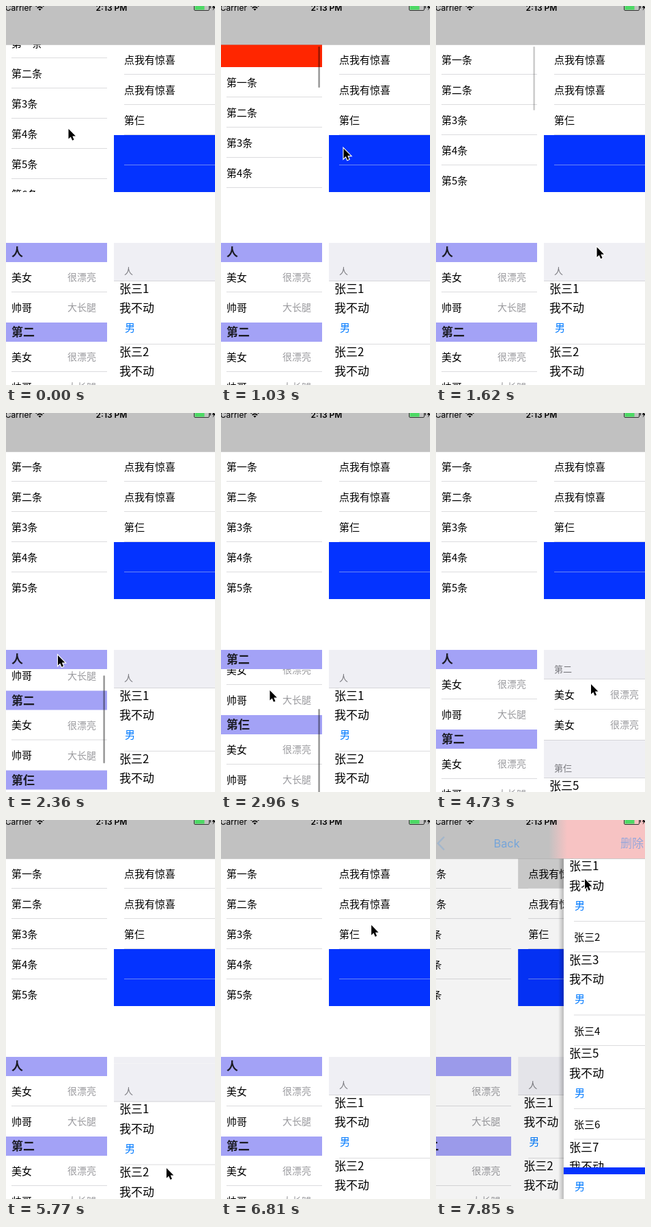
Write an HTML page that moves like this. It is 306 px wide and 552 px high and loops after 8 s.

```html
<!DOCTYPE html>
<html lang="zh">
<head>
<meta charset="utf-8">
<title>Nested lists</title>
<style>
  html, body { margin: 0; width: 100%; height: 100%; overflow: hidden; background: #fff; }
  svg { display: block; }
  text { font-family: "Noto Sans CJK SC", "Noto Sans CJK", sans-serif; }
  .ui { font-family: Inter, Roboto, sans-serif; }
</style>
</head>
<body>
<svg id="stage" width="306" height="552" viewBox="0 0 306 552"></svg>
<script>
const LOOP = 8000, BEATS = 54;
const BLUE = '#0433ff', TINT = '#007aff', LINE = '#dcdcde', GROUP = '#efeff4', EDGE = '#d6d6da';

const rect = (x, y, w, h, fill, extra = '') =>
  `<rect x="${x}" y="${y}" width="${w}" height="${h}" fill="${fill}" ${extra}/>`;
// y is the vertical middle of the glyphs
const label = (s, x, y, size = 15, fill = '#000', extra = '') =>
  `<text x="${x}" y="${y + size * .38}" font-size="${size}" fill="${fill}" ${extra}>${s}</text>`;
const rule = (x, y, w, fill = LINE) => rect(x, y - 1, w, 1, fill);
const frame = (x, y, w, h, body) =>
  `<svg x="${x}" y="${y}" width="${w}" height="${h}" viewBox="${x} ${y} ${w} ${h}">${body}</svg>`;
const group = (id, body) => `<g id="${id}">${body}</g>`;
const bar = (id, y, h) => rect(142.3, y, 2.6, h, '#000', `id="${id}" rx="1.3"`);

const person = (i, x, y) =>
  label('张三' + i, x + 8, y + 10.3, 17) + label('我不动', x + 8, y + 39, 17) +
  label('男', x + 16, y + 67.5, 15, TINT);
const detailRow = (name, note, x, y) =>
  label(name, x, y + 22) + label(note, x + 124, y + 22, 14, '#9a9a9e', 'text-anchor="end"');

function plainList() {
  let s = rect(-7, -144, 155, 200, '#ff2600');
  for (let i = 0; i < 11; i++) {
    const y = 56 + 44 * i;
    s += label(`第${['一', '二'][i] || i + 1}条`, 8, y + 22) + rule(8, y + 44, 140);
  }
  return frame(-7, 56, 155, 215, group('plain', s) + bar('plainBar', 59, 93));
}

function surpriseList() {
  let s = rect(158, 56, 155, 44, '#d2d2d2', 'id="pressed"');
  ['点我有惊喜', '点我有惊喜', '第仨'].forEach((t, i) => {
    s += label(t, 173, 78 + 44 * i) + rule(173, 100 + 44 * i, 140);
  });
  return s + rect(158, 188, 155, 83, BLUE) + rule(173, 232, 140, '#6c84f4');
}

const heads = ['人', '第二', '第仨'];
function stickyList() {
  let rows = '', tops = '';
  heads.forEach((t, i) => {
    const y = 373 + 116 * i;
    rows += detailRow('美女', '很漂亮', 8, y) + rule(8, y + 44, 140) +
      detailRow('帅哥', '大长腿', 8, y + 44);
    tops += group('head' + i, rect(-7, 0, 155, 28, '#a3a2f6') +
      label(t, 8, 14, 17, '#1c1c24', 'font-weight="600"'));
  });
  return frame(-7, 345, 155, 211, group('sticky', rows) + tops + bar('stickyBar', 348, 128));
}

function groupedList() {
  let y = 345, s = rect(158, 245, 155, 100, GROUP);
  heads.forEach((t, i) => {
    s += rect(158, y, 155, 56, GROUP) + (i ? rule(158, y + 1, 155, EDGE) : '') +
      label(t, 173, y + 41, 13, '#77777c') + rule(158, y + 56, 155, EDGE);
    y += 56;
    for (let k = 0; k < 2; k++) {
      s += i === 1 ? detailRow('美女', '很漂亮', 173, y) : person(2 * i + k + 1, 158, y);
      y += i === 1 ? 44 : 92;
      if (!k) s += rule(173, y, 140);
    }
  });
  return frame(158, 345, 155, 211, group('grouped', s));
}

function nextPage() {
  let y = 56, s = rect(-8, 56, 8, 496, 'url(#shade)') + rect(0, 56, 320, 496, '#fff');
  for (let i = 1; i < 8; i++) {
    s += i % 2 ? person(i, 0, y + .5) : label('张三' + i, 15, y + 22.5);
    y += i % 2 ? 92 : 44.5;
    s += rule(15, y, 305);
  }
  return s + rect(0, 506, 320, 10, BLUE) + rect(-22, 0, 342, 56, 'url(#glow)');
}

const statusBar = () =>
  label('Carrier', 38, 2.7, 12, '#000', 'class="ui" text-anchor="end"') +
  `<path d="M43.6 .6Q49.5-4.6 55.4.6M45.8 3Q49.5-.2 53.2 3" fill="none" stroke="#000" stroke-width="1.7"/>
  <path d="M47.4 4.6Q49.5 2.8 51.6 4.6L49.5 6.8Z"/>` +
  label('2:13 PM', 154.5, 2.7, 12, '#000', 'class="ui" font-weight="600" text-anchor="middle"') +
  rect(275.5, -3.5, 22, 10, 'none', 'rx="1.5" stroke="#333"') +
  rect(276.5, -2.5, 14, 8, '#4cd964') + rect(298.5, 0, 1.5, 3.5, '#333') +
  '<path d="M306-4L301.8 2.4H304.2L302.6 6.8L307 1H304.6Z"/>';

const navText = () =>
  `<path d="M12 24.5L2.8 34L12 43.5" fill="none" stroke="${TINT}" stroke-width="2.5" opacity=".4"/>` +
  label('Back', 0, 34, 16.3, TINT, 'id="back" class="ui" text-anchor="middle"') +
  label('删除', 287, 34, 17, TINT, 'text-anchor="middle"');

const stage = document.getElementById('stage');
stage.innerHTML = `<defs>
  <linearGradient id="shade"><stop stop-opacity="0"/><stop offset="1" stop-opacity=".24"/></linearGradient>
  <linearGradient id="glow"><stop stop-color="#f7c3c3" stop-opacity="0"/>
    <stop offset=".08" stop-color="#f7c3c3"/></linearGradient></defs>` +
  rect(0, 0, 306, 552, '#fff') +
  group('home', plainList() + surpriseList() + stickyList() + groupedList()) +
  rect(0, 56, 306, 496, '#000', 'id="dim"') +
  rect(0, 0, 306, 56, '#c1c1c1') +
  group('next', nextPage()) +
  rect(0, 56, 306, .6, '#aaa') +
  group('navText', navText()) +
  statusBar() +
  `<path id="cursor" d="M0 0V14.6L3.3 11.5L5.6 16.8L8 15.7L5.8 10.6H10.4Z"
    stroke="#fff" stroke-width="2.2" paint-order="stroke"/>`;

const el = {};
stage.querySelectorAll('[id]').forEach(e => el[e.id] = e);

// Stops of the pointer: [beat, x, y]
const stops = [[0, 91.5, 179], [5, 100, 300], [7, 179.5, 207.5], [10, 290, 330], [13, 80, 412],
  [16, 76, 353], [24, 67, 455], [27, 68, 532], [32, 227, 395], [39, 235, 507], [48, 218, 102],
  [53, 218, 86]];

const clamp = v => Math.max(0, Math.min(1, v));
const half = v => Math.round(v * 2) / 2;
function ramp(n, from, to) {
  const u = clamp((n - from) / (to - from));
  return u * u * (3 - 2 * u);
}
const pointer = axis => n => stops.slice(1).reduce(
  (v, s, i) => v + (s[axis] - stops[i][axis]) * ramp(n, stops[i][0], s[0]), stops[0][axis]);
const pointerX = pointer(1), pointerY = pointer(2);

// Scroll offsets: a drag, then a bounce or a drag back
const plainOffset = n => 24 - 75 * ramp(n, 0, 5) + 51 * ramp(n, 5, 10);
const stickyOffset = n => 137 * (ramp(n, 13, 19.8) - ramp(n, 23, 29));
const groupedOffset = n => 390.5 * ramp(n, 29, 34) - 400 * ramp(n, 34, 39) + 9.5 * ramp(n, 39, 42);
const pushed = n => .394 * (Math.max(0, n - 51) / 2) ** 1.6;

const set = (e, attrs) => Object.entries(attrs).forEach(([k, v]) => e.setAttribute(k, v));
const move = (e, x, y) => set(e, { transform: `translate(${x} ${y})` });
const barFade = (n, from, to) => n < from ? 0 : .4 * clamp((to - n) / 2);

function draw(ms) {
  // the picture advances in beats, on a clock of whole hundredths
  const n = Math.floor((ms % LOOP + 11) / LOOP * BEATS) % BEATS;
  const plain = half(plainOffset(n)), sticky = half(stickyOffset(n)), push = pushed(n);

  move(el.plain, 0, -plain);
  set(el.plainBar, {
    y: 59 + Math.max(0, plain) * .44, height: 93 + Math.min(0, plain), opacity: barFade(n, 1, 12)
  });

  move(el.sticky, 0, -sticky);
  heads.forEach((_, i) => {
    const y = 345 + 116 * i - sticky;
    move(el['head' + i], 0, Math.max(y, Math.min(345, y + 88)));
  });
  set(el.stickyBar, { y: 348 + sticky * .606, opacity: barFade(n, 13, 31) });

  move(el.grouped, 0, -half(groupedOffset(n)));

  set(el.pressed, { opacity: n >= 50 ? 1 : 0 });
  move(el.home, -96 * push, 0);
  move(el.next, 313 - 320 * push, 0);
  set(el.next, { visibility: push ? 'visible' : 'hidden' });
  set(el.dim, { opacity: push * .12 });
  set(el.navText, { opacity: push });
  set(el.back, { x: 154 - 128 * push });

  move(el.cursor, pointerX(n), pointerY(n));
}

function tick() {
  draw(performance.now());
  requestAnimationFrame(tick);
}
tick();
</script>
</body>
</html>
```
